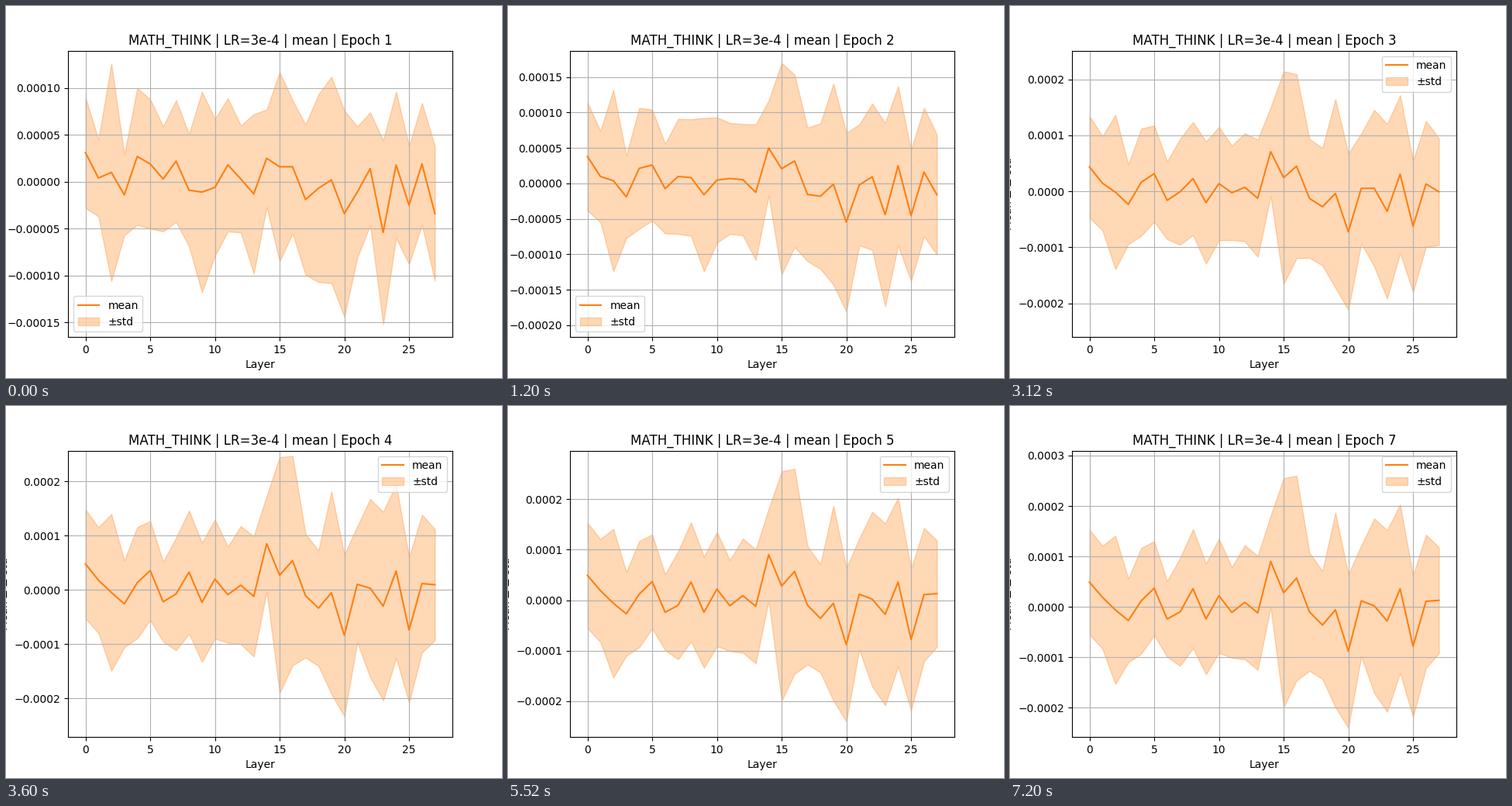
Recreate the animation shown at these times as a matplotlib script. Size 640x480 px, loop 8000 ms.

```python
import math

import numpy as np
import matplotlib.pyplot as plt
from matplotlib.animation import FuncAnimation

ORANGE = "#ff7f0e"
UNIT = 1e-6
FRAMES, INTERVAL = 20, 400     # an epoch lasts three frames
SETTLED = 4                    # epochs until the band takes its late shape
LAYERS = np.arange(28)

# Key profiles over the layers: the band settles from the early to the late one.
EARLY_MEAN = np.array([31, 4, 10, -14, 27, 19, 3, 22, -9, -11, -6, 18, 3, -13,
                       25, 16, 16, -19, -7, 2, -34, -11, 14, -54, 18, -25, 19, -34])
EARLY_STD = np.array([59, 41, 116, 43, 73, 69, 56, 65, 60, 107, 73, 71, 57, 85,
                      52, 101, 71, 80, 100, 110, 110, 70, 60, 98, 78, 63, 65, 72])
LATE_MEAN = np.array([49, 19, -6, -27, 12, 37, -24, -10, 36, -24, 22, -11, 9, -12,
                      90, 28, 57, -10, -36, -6, -88, 12, 2, -28, 36, -78, 11, 13])
LATE_STD = np.array([104, 102, 147, 83, 105, 93, 75, 107, 118, 110, 113, 90, 113, 113,
                     91, 227, 203, 117, 107, 193, 152, 110, 173, 180, 167, 140, 132, 105])

# Vertical range and legend corner of each epoch.
VIEWS = [
    (-165.6, 139.8, "lower left"),
    (-216.7, 187.2, "lower left"),
    (-260.4, 251.5, "upper right"),
    (-271.4, 256.6, "upper right"),
    (-270.9, 296.0, "upper right"),
    (-270.2, 291.5, "upper left"),
    (-258.1, 309.7, "upper right"),
]

fig, ax = plt.subplots(figsize=(6.4, 4.8), dpi=100)


def settle(early, late, epoch):
    """Ease out from the early to the late profile."""
    progress = min(epoch / SETTLED, 1)
    return (early + (late - early) * math.sin(progress * math.pi / 2)) * UNIT


def draw(frame):
    epoch = frame // 3
    low, high, corner = VIEWS[epoch]
    mean = settle(EARLY_MEAN, LATE_MEAN, epoch)
    std = settle(EARLY_STD, LATE_STD, epoch)

    ax.clear()
    ax.plot(LAYERS, mean, color=ORANGE, label="mean")
    ax.fill_between(LAYERS, mean - std, mean + std,
                    color=ORANGE, alpha=0.3, label="±std")
    ax.set_ylim(low * UNIT, high * UNIT)
    ax.set_title(f"MATH_THINK | LR=3e-4 | mean | Epoch {epoch + 1}")
    ax.set_xlabel("Layer")
    ax.set_ylabel("Mean Δ ± std")
    ax.grid(True)
    ax.legend(loc=corner)
    return []


anim = FuncAnimation(fig, draw, frames=FRAMES, interval=INTERVAL,
                     init_func=lambda: [], repeat=True, repeat_delay=0)
plt.show()
```
